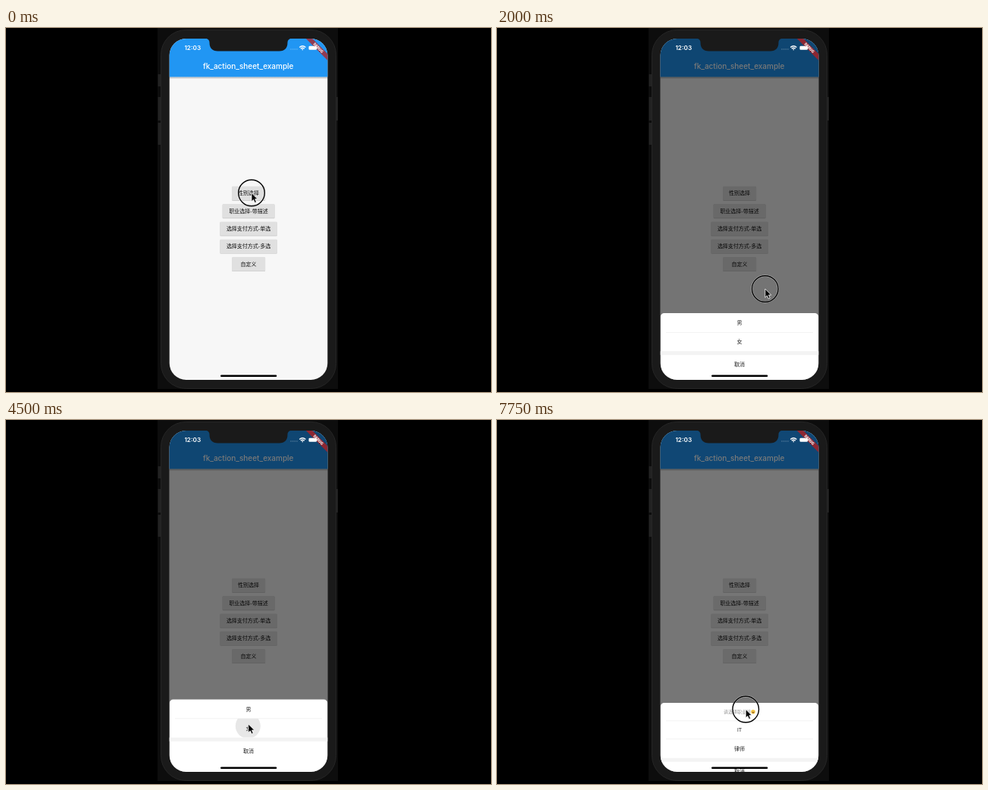
Animation of 640 by 480 pixels, one loop 8 s. Source, as an HTML page:

```html
<!DOCTYPE html>
<html lang="zh">
<head>
<meta charset="utf-8">
<title>Action sheet demo</title>
<style>
  html, body { margin: 0; width: 100%; height: 100%; overflow: hidden; background: #000; }
  svg { display: block; width: 640px; height: 480px; }
  text { font: 7px "Noto Sans CJK SC", "Noto Sans CJK", sans-serif; text-anchor: middle; fill: #222; }
  .bar { font: 500 10px Inter, sans-serif; fill: #fff; }
  .clock { font: 600 8.2px Inter, sans-serif; fill: #fff; }
  .debug { font: 900 5.1px Roboto, sans-serif; fill: #fff; }
  .hint { font-size: 6px; fill: #999; }
  .latin { font-family: Inter, sans-serif; font-size: 6.8px; }
  .buttons text { font-weight: 500; fill: #111; }
  .buttons rect { fill: #e0e0e0; }
  .buttons .shade { fill: #000; opacity: .16; }
  .line { fill: #ececec; }
</style>
</head>
<body>
<svg viewBox="0 0 640 480">
  <defs>
    <clipPath id="screen"><rect x="215.7" y="14" width="208.6" height="450" rx="22"/></clipPath>
    <clipPath id="row"><rect x="216" y="392.3" width="208" height="25"/></clipPath>
    <linearGradient id="drop" x2="0" y2="1">
      <stop stop-opacity=".28"/><stop offset="1" stop-opacity="0"/>
    </linearGradient>
  </defs>

  <!-- phone body -->
  <rect x="200" width="238" height="476" fill="#0d0d0d"/>
  <g fill="#222">
    <rect x="200.5" y="61" width="4" height="16"/>
    <rect x="200.5" y="91" width="4" height="31"/>
    <rect x="200.5" y="125" width="4" height="29"/>
    <rect x="435" y="91" width="3" height="31"/>
  </g>
  <rect x="204.5" y="2.5" width="231" height="473" rx="33" fill="#1a1a1a" stroke="#262626"/>

  <g clip-path="url(#screen)">
    <rect x="215" y="14" width="210" height="450" fill="#f7f7f7"/>
    <rect x="215" y="64.5" width="210" height="3" fill="url(#drop)"/>
    <rect x="215" y="14" width="210" height="50.5" fill="#2196f3"/>
    <text class="bar" x="319.7" y="54.3">fk_action_sheet_example</text>
    <g class="buttons" id="buttons"></g>
    <rect id="dim" x="215" y="14" width="210" height="450"/>

    <g id="sheet">
      <rect id="panel" x="215.7" width="208.6" height="150" rx="5" fill="#fff"/>
      <g id="gender">
        <text x="320" y="382.2">男</text>
        <circle id="ripple" cx="319.3" cy="402" r="16.5" fill="#e7e7e7" clip-path="url(#row)"/>
        <text x="320" y="407.2">女</text>
      </g>
      <g id="job">
        <text class="hint" x="317" y="358.5">请选择职业组</text>
        <g transform="translate(338 356.3)">
          <circle r="2.8" fill="#f8cb4c"/>
          <path d="M-1.5 .5H1.5Q0 2.9-1.5 .5M-1.4-.8h.7M.7-.8h.7" fill="#8a5420" stroke="#8a5420" stroke-width=".4"/>
        </g>
        <rect class="line" x="223" y="368" width="194" height=".6"/>
        <text class="latin" x="320" y="382.4">IT</text>
        <text x="320" y="407.2">律师</text>
      </g>
      <rect class="line" x="223" y="392" width="194" height=".6"/>
      <rect x="215" y="417.2" width="210" height="5" fill="#f3f3f3"/>
      <text x="320" y="437.2">取消</text>
    </g>

    <g transform="translate(424.3 14) rotate(45)">
      <rect x="-24" y="14.1" width="48" height="6" fill="#b71c1c" fill-opacity=".75"/>
      <text class="debug" y="18.9">DEBUG</text>
    </g>
  </g>

  <!-- status bar, notch, home bar -->
  <path d="M263 13.5H377Q371.5 14.5 371.5 19Q371.5 30.4 360.5 30.4H279.5Q268.5 30.4 268.5 19Q268.5 14.5 263 13.5Z" fill="#1a1a1a"/>
  <text class="clock" x="246.3" y="29.4">12:03</text>
  <path d="M375.5 28h9" stroke="#fff" stroke-opacity=".45" stroke-width="1.2" stroke-dasharray="1.2 1.4"/>
  <g fill="none" stroke="#fff" stroke-width="1.3">
    <path d="M387.2 25.6Q391.3 21.9 395.4 25.6M388.8 27.3Q391.3 25.1 393.8 27.3"/>
    <path d="M391.3 27.6v1.6"/>
  </g>
  <rect x="399.5" y="23.8" width="10.5" height="5" rx="1.3" fill="#fff"/>
  <rect x="283" y="457.6" width="74.3" height="2.5" rx="1.25"/>

  <g id="pointer">
    <g id="ring" fill="none">
      <circle r="17.3" stroke="#fff" stroke-opacity=".5" stroke-width="2.4"/>
      <circle r="17.3" stroke="#000" stroke-width="1.4"/>
    </g>
    <path d="M0 0V11.3L2.6 8.9L4.4 13L6.4 12.1L4.7 8.1H8Z" stroke="#fff" stroke-width=".8"/>
  </g>
</svg>
<script>
const $ = id => document.getElementById(id);
const STEP = 250, LOOP = 8000;

const labels = [["性别选择", 44], ["职业选择-带描述", 69], ["选择支付方式-单选", 75.5],
                ["选择支付方式-多选", 75.5], ["自定义", 44]];
$("buttons").innerHTML = labels.map(([label, w], i) => {
  const y = 208.8 + 23.3 * i, x = 320.1 - w / 2;
  const box = `width="${w}" height="18.2" rx="1.2"`;
  return `<rect class="shade" x="${x}" y="${y + 0.9}" ${box}/>
    <rect x="${x}" y="${y}" ${box}/><text x="320.1" y="${y + 11.6}">${label}</text>`;
}).join("");

// pointer stops: step, x, y
const path = [
  [0, 324, 217.5], [1, 324, 217.5], [5, 334, 365], [6, 353.8, 344], [8, 353.8, 344],
  [9, 350.3, 264.3], [11, 325, 217.5], [13, 325, 217.5], [17, 319.8, 401], [18, 319.8, 401],
  [22, 324.3, 238.3], [24, 324.3, 238.3], [25, 323.2, 260.3], [27, 326, 350],
  [28, 326, 350], [30, 328.2, 381.5], [32, 328.2, 381.5]
];
const clicks = [0, 8, 12, 24, 31];

// sheet spans: first step, kind, slide offset, dim
const spans = [
  [0, "", 0, 0], [1, "gender", 0, .54], [8, "gender", 9, .53], [9, "", 0, 0],
  [13, "gender", 25, .5], [14, "gender", 0, .54], [18, "gender", 1.5, .53],
  [19, "", 0, 0], [25, "job", 0, .54], [31, "job", 28.5, .52]
];

function pointerAt(step) {
  const i = path.findIndex(p => p[0] > step);
  const [s0, x0, y0] = path[i - 1], [s1, x1, y1] = path[i];
  const k = (step - s0) / (s1 - s0);
  return [x0 + (x1 - x0) * k, y0 + (y1 - y0) * k];
}

const show = (id, on) => $(id).style.display = on ? "" : "none";

function draw(step) {
  const [, kind, slide, dim] = spans.filter(s => s[0] <= step).pop();
  show("sheet", kind);
  show("gender", kind === "gender");
  show("job", kind === "job");
  show("ripple", step === 18);
  show("ring", clicks.includes(step));
  $("panel").setAttribute("y", kind === "job" ? 344.5 : 367);
  $("sheet").setAttribute("transform", `translate(0 ${slide})`);
  $("dim").setAttribute("opacity", dim);
  $("pointer").setAttribute("transform", `translate(${pointerAt(step)})`);
}

const start = performance.now();
function tick() {
  draw(Math.floor((performance.now() - start) % LOOP / STEP));
  requestAnimationFrame(tick);
}
tick();
</script>
</body>
</html>
```
